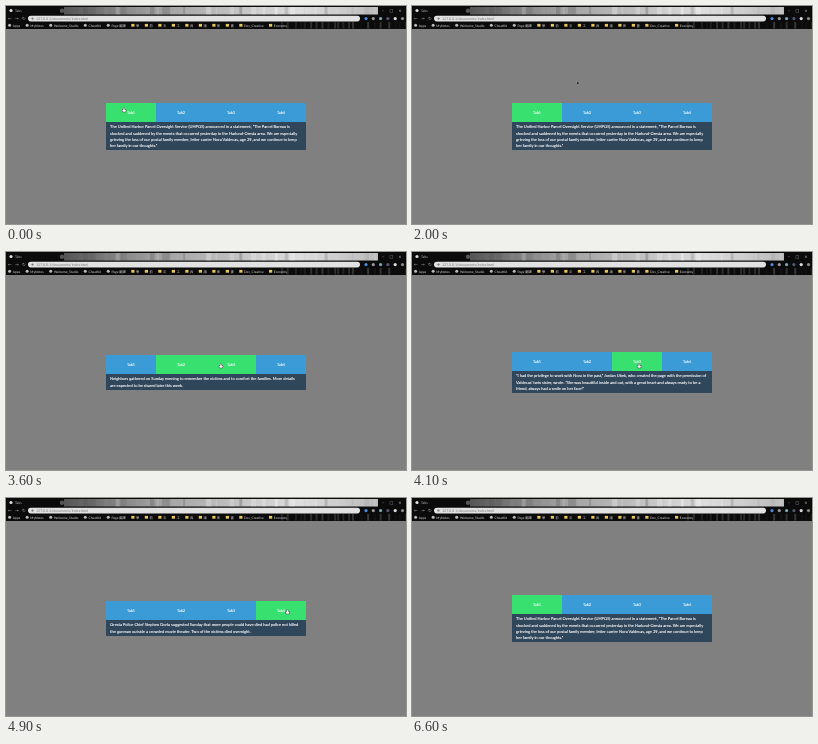
An HTML page with a canvas for the animation above (6900 ms loop, 400 by 218 pixels).

```html
<!DOCTYPE html>
<html lang="en">
<head>
<meta charset="utf-8">
<title>Tabs</title>
<style>
  html, body { margin: 0; width: 100%; height: 100%; overflow: hidden; background: #808080; }
  canvas { display: block; }
</style>
</head>
<body>
<canvas id="stage" width="400" height="218"></canvas>
<script>
const ctx = document.getElementById('stage').getContext('2d');
const LOOP = 6900, STEP = 100;
const GREEN = '#38e070', BLUE = '#3a9bd6', NAVY = '#30465b';
const SANS = 'Lato, "Noto Sans CJK SC", sans-serif', SYMBOLS = '"DejaVu Sans", sans-serif';
const BOX = { x: 100, width: 200, tab: 50, head: 19, line: 6.1, middle: 120.8 };

const PANELS = [
  ['The Unified Harbor Parcel Oversight Service (UHPOS) announced in a statement, “The Parcel Bureau is',
   'shocked and saddened by the events that occurred yesterday in the Harlund-Oresta area. We are especially',
   'grieving the loss of our postal family member, letter carrier Nora Valdecas, age 29, and we continue to keep',
   'her family in our thoughts.”'],
  ['Neighbors gathered on Sunday evening to remember the victims and to comfort the families. More details',
   'are expected to be shared later this week.'],
  ['“I had the privilege to work with Nora in the past,” Jordan Ubek, who created the page with the permission of',
   'Valdecas’ twin sister, wrote. “She was beautiful inside and out, with a great heart and always ready to be a',
   'friend, always had a smile on her face!”'],
  ['Oresta Police Chief Stephen Dorlu suggested Sunday that more people could have died had police not killed',
   'the gunman outside a crowded movie theater. Two of the victims died overnight.']
];

const CLICKS = [{ at: 0, tab: 0 }, { at: 3400, tab: 1 }, { at: 4100, tab: 2 }, { at: 4900, tab: 3 }, { at: 5900, tab: 0 }];

const overTab = i => ({ x: 117.5 + 54.5 * i, y: 111.5 });
const HOME = { x: 117.5, y: 101.5 };
const MOVES = [
  { at: 900, lasts: 400, to: { x: 168, y: 72 } },
  { at: 1900, lasts: 500, to: { x: 130, y: 108 } },
  { at: 2700, lasts: 400, to: overTab(1) },
  { at: 3400, lasts: 300, to: overTab(2) },
  { at: 4100, lasts: 300, to: overTab(3) },
  { at: 4900, lasts: 600, to: { x: 150, y: 84 } },
  { at: 5500, lasts: 300, to: overTab(0) },
  { at: 5900, lasts: 200, to: { x: 57, y: 118 } }
];
const POINTER_LEAVES = 6100;

const ease = k => k < 0.5 ? 2 * k * k : 1 - 2 * (1 - k) ** 2;
const mix = (a, b, k) => a + (b - a) * k;

function random(seed) {
  return () => (seed = seed * 16807 % 2147483647) / 2147483647;
}

function rect(x, y, w, h, color, radius = 0) {
  ctx.fillStyle = color;
  ctx.beginPath();
  ctx.roundRect(x, y, w, h, radius);
  ctx.fill();
}

const disc = (x, y, r, color) => rect(x - r, y - r, 2 * r, 2 * r, color, r);

// Drawn at ten times the size and scaled down to keep fractional glyph spacing; returns the width.
function text(str, x, y, size, color, { align = 'left', weight = 0, font = SANS } = {}) {
  ctx.save();
  ctx.translate(x, y);
  ctx.scale(0.1, 0.1);
  ctx.font = `${size * 10}px ${font}`;
  ctx.textAlign = align;
  ctx.textRendering = 'geometricPrecision';
  ctx.fillStyle = ctx.strokeStyle = color;
  ctx.fillText(str, 0, 0);
  if (weight) {
    ctx.lineWidth = weight * 10;
    ctx.strokeText(str, 0, 0);
  }
  const width = ctx.measureText(str).width / 10;
  ctx.restore();
  return width;
}

// A snowy forest: soft pale trunks across the title bar, faint ones below.
function drawTheme() {
  const next = random(77);
  rect(0, 0, 400, 23, '#0b0b0b');
  const snow = ctx.createLinearGradient(58, 0, 372, 0);
  ['#555', '#999', '#bbb', '#ddd', '#bbb'].forEach((color, i) => snow.addColorStop(i / 4, color));
  rect(58, 1, 314, 7.5, snow);
  for (let x = 70; x < 372; x += 4 + next() * 10) {
    const shade = next() < 0.4 ? 70 : 255;
    rect(x, 1, 1 + next() * 5, 7.5, `rgba(${shade},${shade},${shade},${next() * 0.35})`);
  }
  for (let x = 275; x < 400; x += 3 + next() * 6) rect(x, 16, 2, 6.5, `rgba(160,160,160,${next() * 0.3})`);
}

function drawTitleBar() {
  disc(5, 4.5, 1.6, '#ddd');
  text('Tabs', 9, 5.8, 3.4, '#bbb');
  disc(56, 4.8, 2.2, '#555');
  [...'–□×'].forEach((sign, i) => text(sign, 377 + i * 8.5, 6, 4, '#ccc', { align: 'center', font: SYMBOLS }));
}

function drawAddressBar() {
  [...'←→↻'].forEach((sign, i) => text(sign, 4 + i * 7, 14.2, 4.5, '#aaa', { align: 'center', font: SYMBOLS }));
  rect(22, 9.8, 332, 5.6, '#e2e2e2', 2.8);
  disc(26.5, 12.6, 1.1, '#777');
  text('127.0.0.1/documents/index.html', 30, 13.9, 3.6, '#777');
  ['#4a8be0', '#999', '#7ab', '#557', '#ddd', '#888'].forEach((color, i) => disc(360 + i * 7.3, 12.6, 1.6, color));
}

function drawBookmarks() {
  const labels = ['Apps', 'MyNotes', 'Welcome_Studio', 'CheatKit', 'Page 翻譯', ...'學前文工具語影書', 'Dev_Creative', 'Economy'];
  let x = 2;
  labels.forEach((label, i) => {
    if (i < 5) disc(x + 1.6, 19.3, 1.5, '#bbb');
    else rect(x, 17.9, 3.2, 2.8, '#e5c65c');
    x += 4.8 + text(label, x + 4.8, 20.6, 3.3, '#ddd') + 5.4;
  });
}

function pointerAt(t) {
  if (t >= POINTER_LEAVES) return null;
  return MOVES.filter(move => move.at <= t).reduce((from, { at, lasts, to }) => {
    const k = ease(Math.min(1, (t - at) / lasts));
    return { x: mix(from.x, to.x, k), y: mix(from.y, to.y, k) };
  }, HOME);
}

function drawTabs(selected, pointer) {
  const lines = PANELS[selected];
  const body = Math.round(3.6 + lines.length * BOX.line);
  const top = Math.floor(BOX.middle - (BOX.head + body) / 2);
  const inHead = pointer && pointer.y >= top && pointer.y < top + BOX.head;
  const hovered = inHead ? Math.floor((pointer.x - BOX.x) / BOX.tab) : -1;

  for (let i = 0; i < 4; i++) {
    const x = BOX.x + i * BOX.tab;
    rect(x, top, BOX.tab, BOX.head, i === selected || i === hovered ? GREEN : BLUE);
    text(`Tab${i + 1}`, x + BOX.tab / 2, top + 11, 3.9, '#fff', { align: 'center', weight: 0.1 });
  }
  rect(BOX.x, top + BOX.head, BOX.width, body, NAVY);
  lines.forEach((line, i) =>
    text(line, BOX.x + 4.1, top + BOX.head + 6.4 + i * BOX.line, 4, '#fff', { weight: 0.12 }));
  return hovered >= 0;
}

function drawHand({ x, y }) {
  rect(x - 1.6, y + 1.6, 4.4, 3.2, '#444', 1);
  rect(x - 0.4, y - 0.3, 1.6, 4, '#444', 0.8);
  rect(x - 1.1, y + 2.1, 3.4, 2.2, '#fff', 0.8);
  rect(x, y, 0.9, 3.5, '#fff', 0.4);
}

function drawArrow({ x, y }) {
  ctx.beginPath();
  ctx.moveTo(x, y);
  ctx.lineTo(x, y + 3.8);
  ctx.lineTo(x + 2.6, y + 2.7);
  ctx.closePath();
  ctx.fillStyle = '#111';
  ctx.fill();
  ctx.strokeStyle = '#bbb';
  ctx.lineWidth = 0.4;
  ctx.stroke();
}

function draw(now) {
  const t = Math.floor(now % LOOP / STEP) * STEP;
  const selected = CLICKS.filter(click => click.at <= t).pop().tab;
  const pointer = pointerAt(t);
  rect(0, 0, 400, 218, '#808080');
  drawTheme();
  drawTitleBar();
  drawAddressBar();
  drawBookmarks();
  const onTab = drawTabs(selected, pointer);
  if (pointer) (onTab ? drawHand : drawArrow)(pointer);
}

const start = performance.now();
function frame() {
  draw(performance.now() - start);
  requestAnimationFrame(frame);
}
frame();
</script>
</body>
</html>
```
